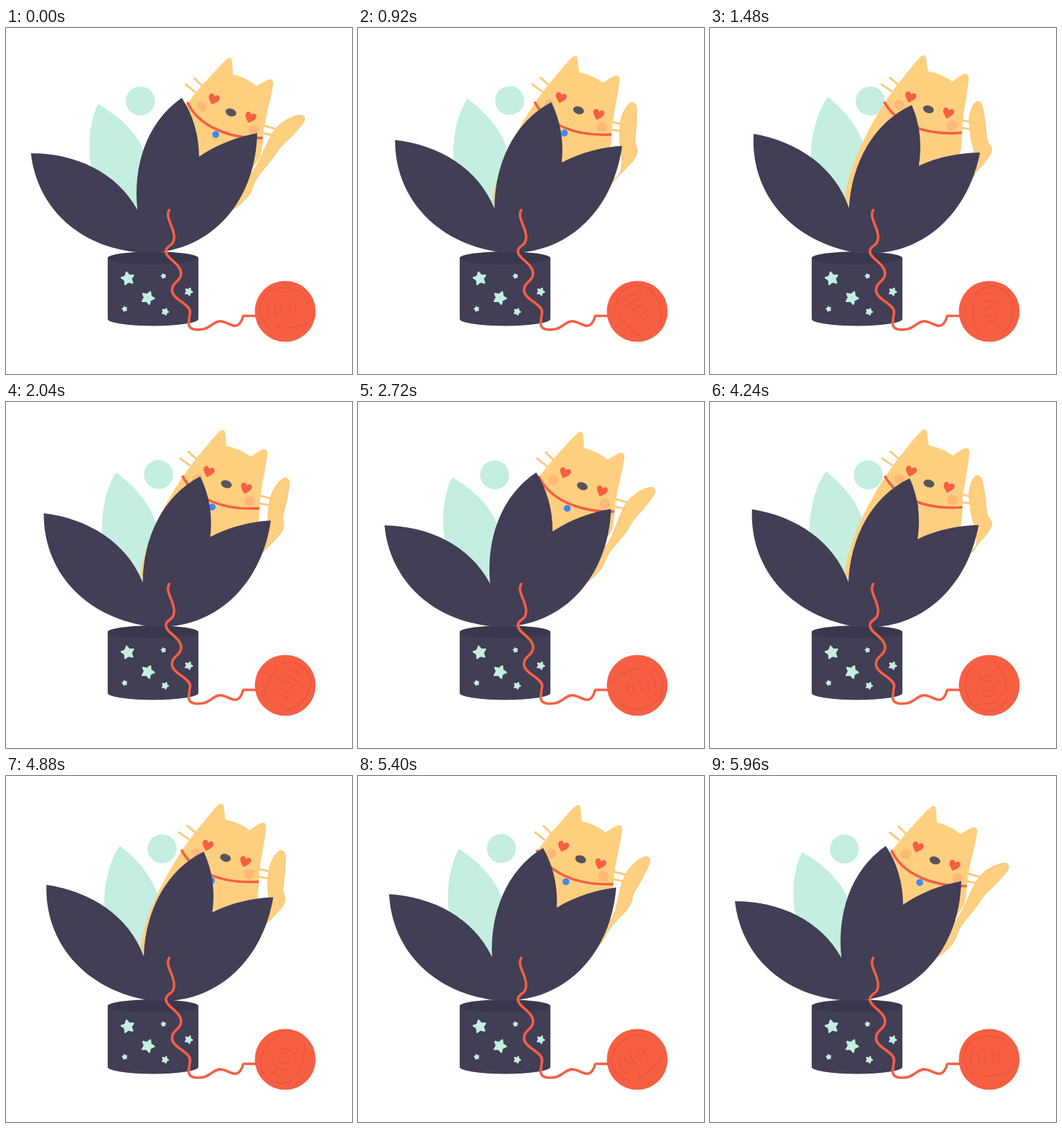
These frames come from a looping animation (500 px wide and 500 px high, 6 s). An HTML page:

```html
<!DOCTYPE html>
<html lang="en">
<head>
<meta charset="utf-8">
<title>Cat in a plant</title>
<style>
html, body { margin: 0; width: 100%; height: 100%; overflow: hidden; background: #fff; }
svg { display: block; width: 100vw; height: 100vh; }
.dark { fill: #413e55; }
.mint { fill: #c4eee0; }
.fur { fill: #ffcf80; }
.red { fill: #f75f43; }
.line { fill: none; stroke: #f75f43; stroke-width: 3.7; stroke-linejoin: round; }
.whisker { fill: none; stroke: #f9ca7c; stroke-width: 3; }
.strand { fill: none; stroke: #e4543b; stroke-width: 1.2; stroke-linecap: round; }
</style>
</head>
<body>
<svg viewBox="0 0 500 500">
  <defs>
    <path id="heart" class="red" d="M0 8C-4 4-8 1-8-3C-8-8-2-9 0-4C2-9 8-8 8-3C8 1 4 4 0 8Z"/>
  </defs>

  <path class="dark" d="M147 332H278V420.500A65.5 10 0 0 1 147 420.500Z"/>
  <ellipse cx="212.5" cy="332.5" rx="65.5" ry="9.5" fill="#3a374d"/>
  <g id="stars" class="mint" stroke="#c4eee0" stroke-width="2" stroke-linejoin="round"></g>

  <g class="sway mint">
    <path d="M133 110C117 140 118 190 128 220L195 275L204 190C193 155 168 130 133 110Z"/>
    <circle cx="194" cy="105.5" r="21"/>
  </g>

  <path id="tail" class="fur" stroke="#f4c273"/>
  <g id="cat">
    <path class="whisker" d="M271.500 72L284 84M259 81L274 93M371 140.500L390 146M370 151.500L389 156"/>
    <path class="fur" d="M195 250C200 205 238 135 283 83C297 68 308 55 319 45Q326 41 326.500 48L328 67Q348 72 362 84Q372 77 381 74Q387 74 386 82C382 110 372 135 371 165L368 185L320 260Z"/>
    <g fill="#ffb878"><circle cx="283" cy="113" r="7.500"/><circle cx="357.500" cy="147.500" r="7.500"/></g>
    <use href="#heart" transform="translate(300 103) rotate(20)"/>
    <use href="#heart" transform="translate(353 129.500) rotate(20)"/>
    <ellipse cx="325" cy="122" rx="8" ry="5.500" transform="rotate(20 325 122)" fill="#57545a"/>
    <path class="line" d="M262 107C276 138 315 160 371 159"/>
    <circle cx="303" cy="154" r="5" fill="#4387f3"/>
  </g>

  <path class="sway dark" d="M36 181C100 181 160 208 190 263C183 200 203 136 254 101C270 125 279 155 279 186C305 168 335 157 363 152C361 247 300 323 205 325C110 322 45 262 36 181Z"/>

  <path class="line" stroke-linecap="round" d="M236 263C229 273 243 287 243 302S231 313 231 323S253 341 253 354S240 366 240 379S266 399 266 410S257 436 277 436S298 423 311 424S335 442 343 416H362"/>
  <circle class="red" cx="403.500" cy="409.500" r="44"/>
  <g id="yarn" class="strand">
    <path d="M379 417Q375 407 380 398M390 416Q385 406 391 397M400 416Q394 407 400 399M409 413Q414 406 408 398M416 414Q421 406 415 398"/>
    <path d="M372 388C384 372 419 370 434 390M379 430C364 416 364 398 374 388M390 432Q412 437 436 426"/>
  </g>
</svg>
<script>
const LOOP = 6000, HALF = 3000, PEAK = 1500, TAIL_PEAK = 1330;
const get = id => document.getElementById(id);
const smooth = p => p * p * (3 - 2 * p);
const swing = (t, peak) => smooth(t < peak ? t / peak : (HALF - t) / (HALF - peak));

function star([x, y, r], k) {
  const turn = k % 2 ? 0.4 : -0.2;
  const pts = Array.from({ length: 10 }, (_, i) => {
    const a = turn + i * Math.PI / 5, q = i % 2 ? r * 0.53 : r;
    return [x + q * Math.sin(a), y - q * Math.cos(a)];
  });
  return `<polygon points="${pts.join(" ")}"/>`;
}

get("stars").innerHTML = [
  [176, 362, 9.5], [205, 390, 9.5], [227.5, 358.5, 3],
  [264, 381, 5.5], [171.5, 406, 3.2], [230, 410, 4.7]
].map(star).join("");

// Smooth closed path through points
function curve(pts) {
  const at = i => pts.at(i % pts.length);
  return pts.reduce((d, b, i) => {
    const a = at(i - 1), c = at(i + 1), e = at(i + 2);
    const out = b.map((v, j) => v + (c[j] - a[j]) / 6);
    const into = c.map((v, j) => v - (e[j] - b[j]) / 6);
    return d + "C" + [out, into, c].join(" ");
  }, "M" + pts[0]);
}

// The stretched tail; it bends around the elbow, less and less towards its root
const tail = [
  [358, 205], [385, 152], [405, 133], [426, 126], [431, 134], [416, 153],
  [397, 172], [384, 190], [362, 218], [350, 243], [326, 262], [320, 240]
];
const elbow = [386, 163], BEND = 52 * Math.PI / 180;

function bend([x, y], angle) {
  const a = angle * Math.max(0, Math.min(1, (225 - y) / 35));
  const dx = x - elbow[0], dy = y - elbow[1], c = Math.cos(a), s = Math.sin(a);
  return [elbow[0] + dx * c + dy * s, elbow[1] - dx * s + dy * c];
}

const leaves = document.querySelectorAll(".sway");
const rotate = (el, angle, x, y) => el.setAttribute("transform", `rotate(${angle} ${x} ${y})`);

function draw(now) {
  const t = now % LOOP, k = swing(t % HALF, PEAK);
  const angle = BEND * swing(t % HALF, TAIL_PEAK);
  leaves.forEach(el => rotate(el, 9.8 * k, 212.5, 325));
  rotate(get("cat"), -3.7 * k, 250, 265);
  rotate(get("yarn"), 360 * t / LOOP, 403.5, 409.5);
  get("tail").setAttribute("d", curve(tail.map(p => bend(p, angle))));
}

let start;
function tick(now) {
  start ??= now;
  draw(now - start);
  requestAnimationFrame(tick);
}
draw(0);
requestAnimationFrame(tick);
</script>
</body>
</html>
```
